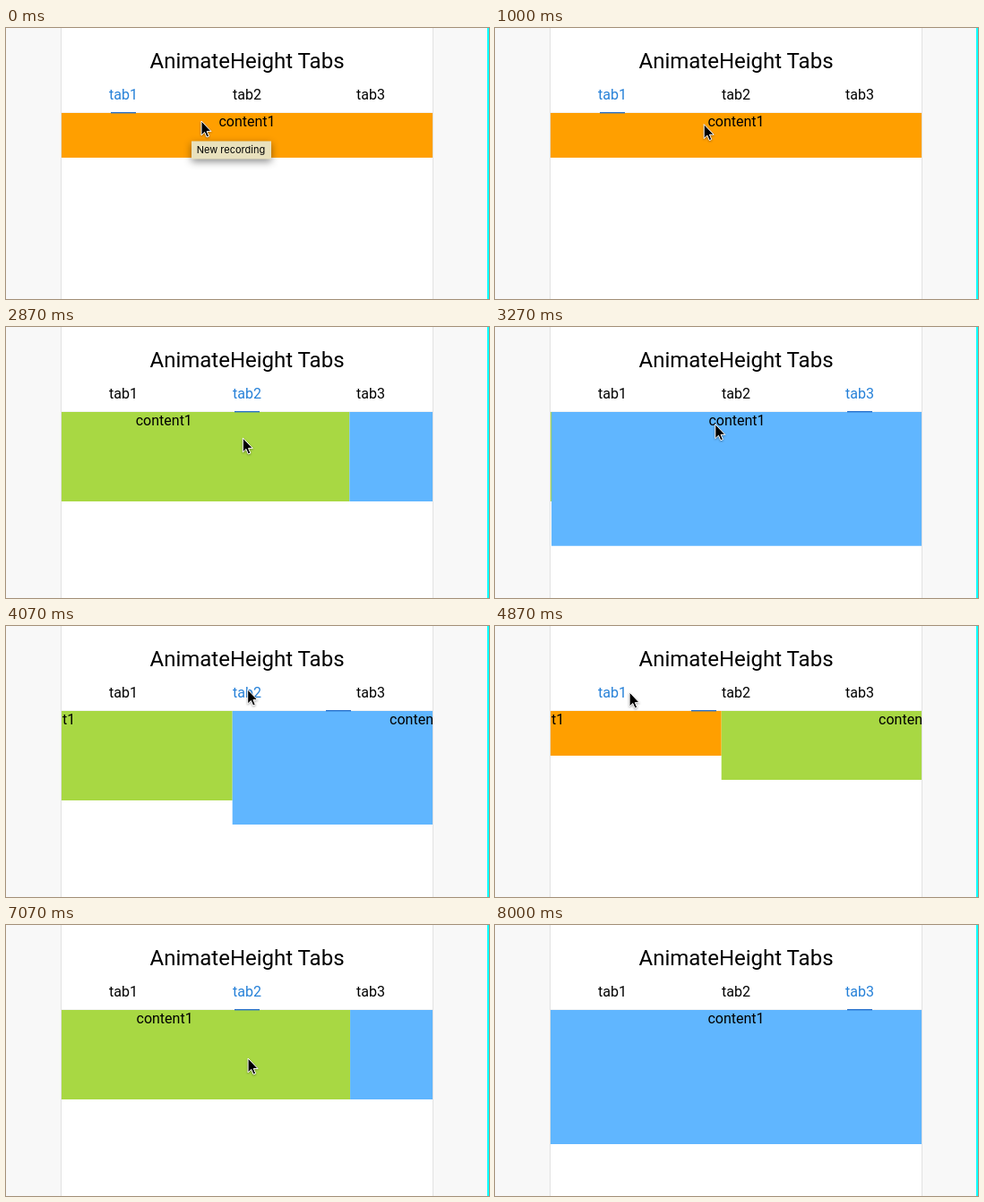
Animation of 539 by 303 pixels, one loop 8.34 s. Source, as an HTML page:

```html
<!DOCTYPE html>
<html lang="en">
<head>
<meta charset="utf-8">
<title>AnimateHeight Tabs</title>
<style>
  html, body { margin: 0; width: 100%; height: 100%; overflow: hidden; background: #f8f8f8; }
  svg { display: block; }
  text { font: 16px Roboto, "Open Sans", sans-serif; text-anchor: middle; }
  .title { font-size: 24px; }
  .tab.on { fill: #2580d8; }
  #tip { filter: drop-shadow(0 3px 4px rgba(0, 0, 0, .45)); }
  #tip text { font: 11px Inter, sans-serif; }
  #cursor { filter: drop-shadow(0 1px 1px rgba(0, 0, 0, .35)); }
</style>
</head>
<body>
<svg width="539" height="303" viewBox="0 0 539 303">
  <rect width="539" height="303" fill="#f8f8f8"/>
  <rect x="61" width="416" height="303" fill="#e2e2e2"/>
  <rect x="62" width="414" height="303" fill="#fff"/>
  <rect x="537" width="2" height="303" fill="#0ff"/>
  <text class="title" x="269" y="45">AnimateHeight Tabs</text>
  <g id="tabs"></g>
  <rect x="62" y="94" width="414" height="1" fill="#f3f3f3"/>
  <svg id="view" x="62" y="95" width="414" overflow="hidden"><g id="slides"></g></svg>
  <rect id="ink" y="94" width="28" height="1.4" fill="#2a72cc"/>
  <g id="tip">
    <rect x="207" y="126.5" width="89" height="20" fill="#e9e1bd"/>
    <text x="251" y="140">New recording</text>
  </g>
  <path id="cursor" d="M0 0V16L3.7 12.5 6 18 8.6 17 6.2 11.6H11Z" stroke="#fff"/>
</svg>
<script>
const LOOP = 8340, STEP = 1000 / 15;
const WIDTH = 414, TAB = WIDTH / 3;
const PRESS = 240, GLIDE = 60; // pointer time before and after a release
const SLIDE = 350, SLIDE_DELAY = 8, INK = 300;

// Pointer stops: release time, chosen tab, start point, swipe length (0 = click).
// The first and last only bring the pointer in and out.
const stops = [
  { at: 0, tab: 0, x: 218, y: 104, swipe: 0 },
  { at: 1740, tab: 1, x: 239, y: 109, swipe: 122 },
  { at: 2940, tab: 2, x: 357, y: 124, swipe: 121 },
  { at: 3992, tab: 1, x: 270, y: 71, swipe: 0 },
  { at: 4792, tab: 0, x: 150, y: 74, swipe: 0 },
  { at: 6073, tab: 1, x: 302, y: 121, swipe: 136 },
  { at: 7140, tab: 2, x: 362, y: 149, swipe: 120 },
  { at: 7840, tab: 2, x: 700, y: 140, swipe: 0 }
];

const $ = id => document.getElementById(id);
const mix = (a, b, k) => a + (b - a) * k;
const clamp = k => Math.min(1, Math.max(0, k));
const smooth = k => k * k * (3 - 2 * k);
const slideHeight = tab => 50 * (tab + 1);
const inkX = tab => 117 + TAB * tab;

function bezier(x1, y1, x2, y2) {
  const at = (a, b, u) => 3 * a * u * (1 - u) ** 2 + 3 * b * u * u * (1 - u) + u ** 3;
  return k => {
    if (k <= 0 || k >= 1) return clamp(k);
    let lo = 0, hi = 1;
    for (let i = 0; i < 24; i++) {
      const mid = (lo + hi) / 2;
      if (at(x1, x2, mid) < k) lo = mid; else hi = mid;
    }
    return at(y1, y2, lo);
  };
}
const slideEase = bezier(.15, .3, .25, 1);
const inkEase = bezier(.35, 0, .25, 1);

$('tabs').innerHTML = [0, 1, 2].map(i =>
  `<text class="tab" x="${62 + TAB * (i + .5)}" y="80">tab${i + 1}</text>`).join('');
$('slides').innerHTML = ['#ff9f00', '#a8d843', '#60b6ff'].map((fill, i) =>
  `<g transform="translate(${i * WIDTH})">
    <rect width="${WIDTH}" height="${slideHeight(i)}" fill="${fill}"/>
    <text x="${WIDTH / 2}" y="15">content1</text>
  </g>`).join('');

const swiped = (stop, t) =>
  stop.swipe * Math.sin(Math.PI / 2 * clamp((t - stop.at + PRESS) / (PRESS + GLIDE)));

function pointer(t) {
  const i = stops.findLastIndex(s => t >= s.at - PRESS);
  const stop = stops[i], next = stops[i + 1] ?? stop;
  const leave = stop.at + GLIDE, arrive = next.at - PRESS;
  const k = smooth(clamp((t - leave) / (arrive - leave)));
  return [mix(stop.x - swiped(stop, t), next.x, k), mix(stop.y, next.y, k)];
}

function state(t) {
  let tab = 0, scroll = 0, height = slideHeight(0), ink = inkX(0);
  for (const stop of stops) {
    scroll += swiped(stop, Math.min(t, stop.at));
    if (t < stop.at) break;
    tab = stop.tab;
    const k = slideEase((t - stop.at - SLIDE_DELAY) / SLIDE);
    scroll = mix(scroll, tab * WIDTH, k);
    height = mix(height, slideHeight(tab), k);
    ink = mix(ink, inkX(tab), inkEase((t - stop.at) / INK));
  }
  return { tab, scroll, height, ink };
}

function draw(now) {
  const t = Math.floor((now % LOOP + 4) / STEP) * STEP;
  const { tab, scroll, height, ink } = state(t);
  [...$('tabs').children].forEach((el, i) => el.classList.toggle('on', i === tab));
  $('view').setAttribute('height', height);
  $('slides').setAttribute('transform', `translate(${-scroll})`);
  $('ink').setAttribute('x', ink);
  $('tip').style.opacity = 1 - clamp((t - 60) / 300);
  $('cursor').setAttribute('transform', `translate(${pointer(t)})`);
}

let begin;
function frame(now) {
  begin ??= now;
  draw(now - begin);
  requestAnimationFrame(frame);
}
draw(0);
requestAnimationFrame(frame);
</script>
</body>
</html>
```
